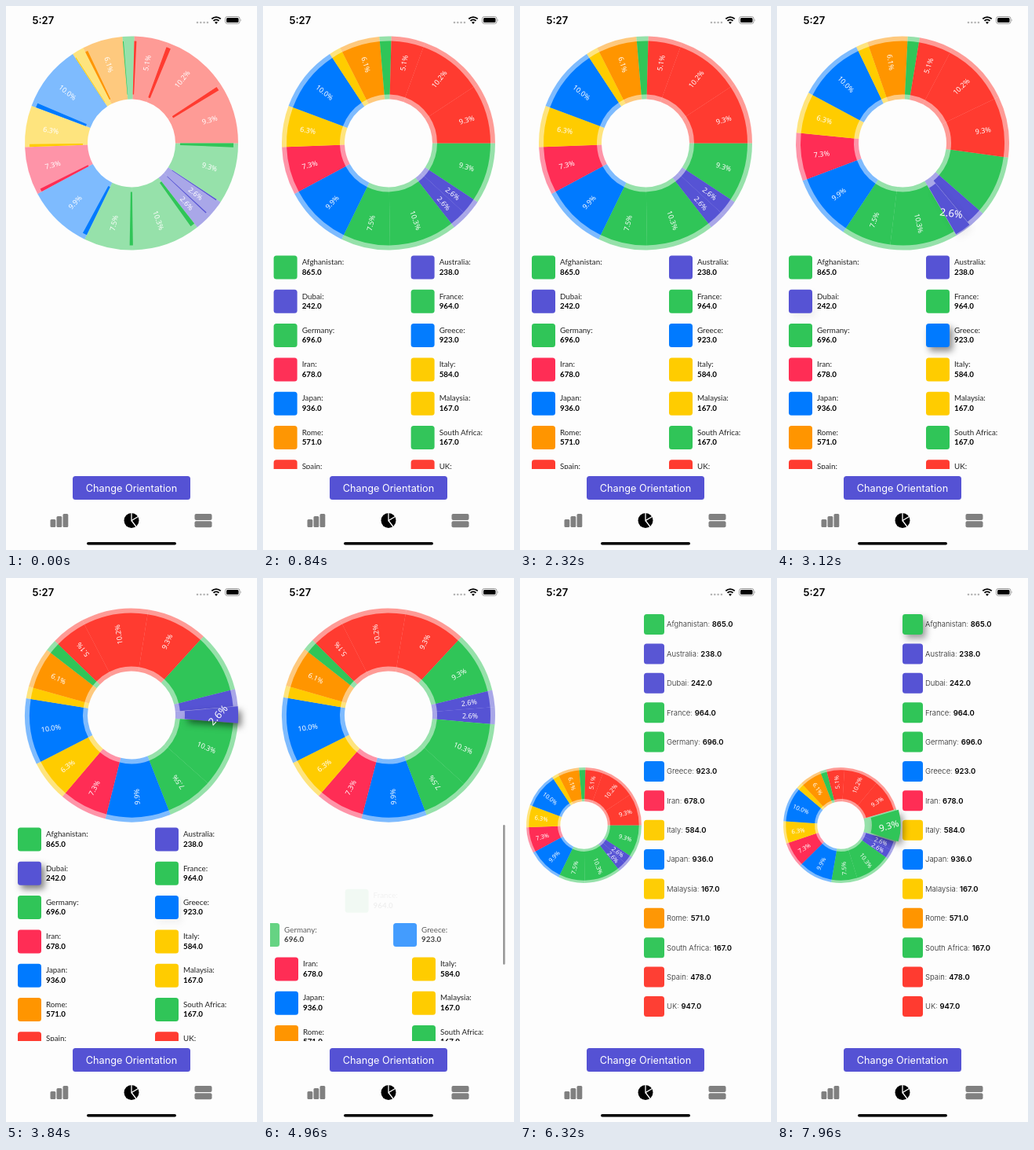
These frames come from a looping animation (320x692 px, 8 s). An HTML page:

```html
<!DOCTYPE html>
<html lang="en">
<head>
<meta charset="utf-8">
<title>Pie chart</title>
<style>
html, body { margin: 0; width: 100%; height: 100%; overflow: hidden; background: #fdfdfd; }
svg { display: block; width: 320px; height: 692px; font-family: Inter, sans-serif; }
.share { font-family: "Noto Sans", sans-serif; fill: #fff; font-weight: 500; text-anchor: middle; dominant-baseline: central; }
.two { font: 9.8px Lato, sans-serif; }
.one { font-size: 9.5px; }
.name { fill: #222; }
.one .name { font-weight: 300; }
.two .value { font-weight: 700; }
.one .value { font-weight: 600; fill: #000; }
</style>
</head>
<body>
<svg viewBox="0 0 320 692">
  <defs><clipPath id="list"><rect x="9" y="314" width="300" height="275"/></clipPath></defs>
  <rect width="320" height="692" fill="#fdfdfd"/>

  <text x="33.500" y="22.500" font-size="13" font-weight="600">5:27</text>
  <g fill="#b5b5b5">
    <circle cx="244" cy="21" r="1.300"/><circle cx="248.300" cy="21" r="1.300"/>
    <circle cx="252.600" cy="21" r="1.300"/><circle cx="256.900" cy="21" r="1.300"/>
  </g>
  <g fill="none" stroke="#000" stroke-width="1.900">
    <path d="M262.300 16.400a8.200 8.200 0 0 1 11.400 0"/>
    <path d="M264.500 18.900a5 5 0 0 1 7 0"/>
  </g>
  <path d="M268 23l-2-2.200a3 3 0 0 1 4 0z"/>
  <rect x="279.500" y="13.500" width="18.500" height="9" rx="2.700" fill="none" stroke="#999"/>
  <rect x="281" y="15" width="15.500" height="6" rx="1.500"/>
  <path d="M299 16.500q1.500 1.500 0 3z" fill="#999"/>

  <g id="legend"></g>
  <g id="chart"></g>

  <rect x="85" y="598" width="150" height="30" rx="3.500" fill="#5552d4"/>
  <text x="160" y="617.500" font-size="12.700" fill="#fff" text-anchor="middle">Change Orientation</text>

  <g fill="#808080">
    <rect x="56.500" y="653" width="6.800" height="10" rx="1.500"/>
    <rect x="64.500" y="649" width="6.800" height="14" rx="1.500"/>
    <rect x="72.500" y="646" width="6.800" height="17" rx="1.500"/>
    <rect x="240.500" y="646" width="22" height="8" rx="2"/>
    <rect x="240.500" y="655.200" width="22" height="8" rx="2"/>
  </g>
  <circle cx="160" cy="654.500" r="9.500"/>
  <path d="M160 644.500v10l8.500-5M160 654.500l6 8" fill="none" stroke="#fdfdfd" stroke-width="1.300"/>
  <rect x="103" y="682" width="114" height="3.600" rx="1.800"/>
</svg>

<script>
const LOOP = 8000, SWITCH = 5560;
const GREEN = '#30c558', PURPLE = '#5653d4', BLUE = '#007aff', PINK = '#ff2d55',
      YELLOW = '#ffcc00', ORANGE = '#ff9500', RED = '#ff3b30';

const items = [
  ['Afghanistan', 865, GREEN], ['Australia', 238, PURPLE], ['Dubai', 242, PURPLE],
  ['France', 964, GREEN], ['Germany', 696, GREEN], ['Greece', 923, BLUE],
  ['Iran', 678, PINK], ['Italy', 584, YELLOW], ['Japan', 936, BLUE],
  ['Malaysia', 167, YELLOW], ['Rome', 571, ORANGE], ['South Africa', 167, GREEN],
  ['Spain', 478, RED], ['UK', 947, RED], ['USA', 865, RED]
].map(([name, value, color]) => ({ name, value, color }));

const total = items.reduce((sum, item) => sum + item.value, 0);
let turn = 0;
for (const item of items) {
  item.start = turn;
  item.sweep = item.value / total * 360;
  item.mid = turn + item.sweep / 2;
  turn += item.sweep;
}

// item index, selected at, released at
const picks = [[5, 2350, 3017], [2, 3017, 4240], [0, 7480, LOOP]];
const scrollKeys = [[4300, 0], [4620, -120], [4960, 35], [5350, 0]];
// rows that slide in again after scrolling: row -> [hidden at, shown at]
const reentry = { 0: [4520, 4975], 1: [4570, 4913], 2: [4605, 4613], 7: [0, 4380] };

const legend = document.getElementById('legend');
const chart = document.getElementById('chart');
const clamp = x => Math.min(1, Math.max(0, x));
const mix = (a, b, p) => a + (b - a) * p;

function spring(t, start, speed) {
  const x = Math.max(0, t - start) * speed / 1000;
  return 1 - (1 + x) * Math.exp(-x);
}

function keyed(t, keys) {
  if (t <= keys[0][0]) return keys[0][1];
  for (let i = 1; i < keys.length; i++) {
    const [t0, v0] = keys[i - 1], [t1, v1] = keys[i];
    if (t < t1) {
      const p = (t - t0) / (t1 - t0);
      return mix(v0, v1, p * p * (3 - 2 * p));
    }
  }
  return keys[keys.length - 1][1];
}

function rotation(t) {
  if (t < 3017) return -134 * spring(t, 2350, 11);
  if (t < SWITCH) return mix(-134, 313, spring(t, 3017, 11));
  return -items[0].mid * spring(t, 7480, 12);
}

function glow(t, index) {
  let k = 0;
  for (const [i, on, off] of picks) {
    if (i === index) k = Math.max(k, spring(t, on, 5) * (1 - spring(t, off, 5)));
  }
  return k;
}

const shadow = k => k < .01 ? '' :
  `style="filter:drop-shadow(4px 5px 4px rgba(0,0,0,${(.55 * k).toFixed(3)}))"`;

function polar(r, deg) {
  const a = deg * Math.PI / 180;
  return [r * Math.cos(a), r * Math.sin(a)];
}

function sector(r0, r1, from, sweep) {
  const to = from + sweep;
  return `M${polar(r1, from)}A${r1} ${r1} 0 0 1 ${polar(r1, to)}` +
         `L${polar(r0, to)}A${r0} ${r0} 0 0 0 ${polar(r0, from)}Z`;
}

function drawChart(t) {
  const small = t >= SWITCH;
  const [cx, cy, s] = small ? [81.5, 314.5, .54] : [160, 174.5, 1];
  const rot = rotation(t);
  const grow = clamp(1.03 * spring(t, small ? SWITCH : -55, 7.5));
  const pick = picks.find(([, on, off]) => t >= on && t < off);
  let back = '', front = '', popped = '';

  items.forEach((item, i) => {
    const from = item.start + rot;
    back += `<path d="${sector(56 * s, 136 * s, from, item.sweep)}" fill="${item.color}" opacity=".5"/>`;

    const active = pick && pick[0] === i;
    const lift = active ? 6 * spring(t, pick[1], 25) : 0;
    const flip = item.mid > 90 && item.mid < 270 ? 180 : 0;
    const angle = active ? rot : item.mid + rot - flip;
    const size = active ? (small ? 11.5 : 13) : (small ? 7.6 : 9);
    const [x, y] = polar((small ? 55 : 104), item.mid + rot);
    const share = item.value / total * 100;
    let part = `<path d="${sector(62 * s, 130 * s, from, item.sweep * grow)}" fill="${item.color}"` +
               ` ${active ? shadow(glow(t, i)) : ''}/>`;
    const label = share < 2 ? '' :
      `<text class="share" font-size="${size}" transform="translate(${x} ${y}) rotate(${angle})">${share.toFixed(1)}%</text>`;
    if (active) popped = `<g transform="translate(${polar(lift, item.mid + rot)})">${part}${label}</g>`;
    else { front += part; back += ''; popped = label + popped; }
  });
  chart.setAttribute('transform', `translate(${cx} ${cy})`);
  chart.innerHTML = back + front + popped;
}

function cell(t, item, i, x, y, side, texts) {
  return `<rect x="${x}" y="${y}" width="${side}" height="${side}" rx="3.5" fill="${item.color}" ${shadow(glow(t, i))}/>${texts}`;
}

function slide(p, content) {
  return `<g transform="translate(${-90 * (1 - p)} 0)" opacity="${p}">${content}</g>`;
}

function scrollBar(t, y) {
  const alpha = clamp((t - 4300) / 80) * clamp((5650 - t) / 250);
  if (!alpha) return '';
  const over = Math.max(0, y, -71 - y);
  const height = 218 - 1.15 * over;
  const top = y > 0 ? 314 : Math.min(314 - y * .8, 589 - height);
  return `<rect x="306" y="${top}" width="2.6" height="${height}" rx="1.3" fill="#999" opacity="${alpha}"/>`;
}

function twoColumns(t) {
  const scroll = keyed(t, scrollKeys);
  let rows = '';
  for (let row = 0; row < 8; row++) {
    const [hidden, shown] = reentry[row] || [LOOP, LOOP];
    const p = t < hidden ? spring(t, 20, 7.5) : t < shown && hidden < LOOP ? 0 : spring(t, shown < LOOP ? shown : 20, 7.5);
    const y = 317.5 + row * 43.3 + scroll;
    const pair = items.slice(row * 2, row * 2 + 2).map((item, col) => {
      const x = 15 + col * 175;
      return cell(t, item, row * 2 + col, x, y, 30,
        `<text class="name" x="${x + 36}" y="${y + 11.7}">${item.name}:</text>` +
        `<text class="value" x="${x + 36}" y="${y + 24.3}">${item.value.toFixed(1)}</text>`);
    });
    rows += slide(p, pair.join(''));
  }
  return `<g class="two" clip-path="url(#list)">${rows}${scrollBar(t, scroll)}</g>`;
}

function oneColumn(t) {
  const rows = items.slice(0, 14).map((item, i) => {
    const y = 46 + i * 37.38;
    return cell(t, item, i, 160, y, 26,
      `<text x="189" y="${y + 16.4}"><tspan class="name">${item.name}: </tspan>` +
      `<tspan class="value">${item.value.toFixed(1)}</tspan></text>`);
  });
  return `<g class="one">${slide(spring(t, SWITCH, 7.5), rows.join(''))}</g>`;
}

const began = performance.now();
function frame() {
  const t = (performance.now() - began) % LOOP;
  legend.innerHTML = t < SWITCH ? twoColumns(t) : oneColumn(t);
  drawChart(t);
  requestAnimationFrame(frame);
}
frame();
</script>
</body>
</html>
```
